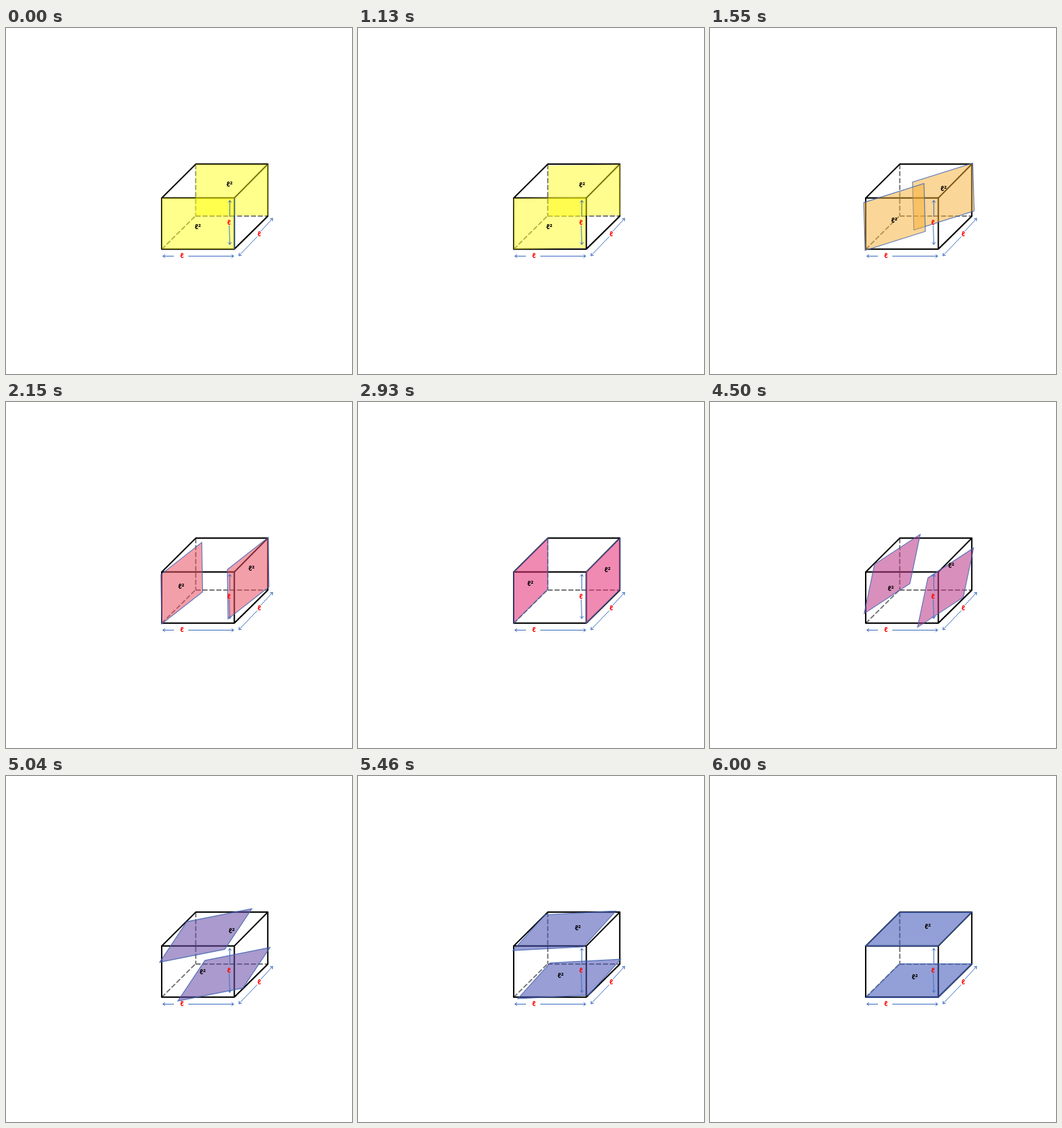
Recreate the animation shown at these times as an HTML page. Size 480x480 px, loop 7.2 s.

```html
<!DOCTYPE html>
<html lang="en">
<head>
<meta charset="utf-8">
<title>Box faces</title>
<style>
html, body { margin: 0; width: 100%; height: 100%; overflow: hidden; background: #fff; }
svg { display: block; width: 480px; height: 480px; }
.edge { fill: none; stroke: #000; stroke-width: 1.9; stroke-linejoin: round; }
.hidden { fill: none; stroke: #6b6b6b; stroke-width: 1.7; stroke-dasharray: 7 2.6; }
.arrow { fill: none; stroke: #4472c4; stroke-width: 1; }
text { font: bold 9.5px "Open Sans", "DejaVu Sans", sans-serif; text-anchor: middle; }
.size { fill: #f00; }
</style>
</head>
<body>
<svg viewBox="0 0 480 480">
  <path class="hidden" d="M263.3 189V260.5M216 307L263 260.5M263 260.8H363"/>
  <path class="edge" d="M216 235.8H316.7V306.8H216ZM216 235.8L263.3 188.8H363.2V261L316.7 306.8M316.7 235.8L363.2 188.8"/>
  <g id="faces"></g>
  <path id="side" d="M317 236V307" stroke="#3f62a8" stroke-width="1.2"/>
  <g id="arrows"></g>
  <text class="size" x="244" y="318.5">ℓ</text>
  <text class="size" x="309.3" y="272.5">ℓ</text>
  <text class="size" x="351.3" y="288.5">ℓ</text>
  <g id="labels"></g>
</svg>
<script>
const LOOP = 7200, STEP = 60, STEPS = 31;
const STARTS = [1130, 4200];

// Three poses: length and angle of the two sides, fill colour and opacity.
const POSES = [
  { w: 100.8, wa: 0, h: 71, ha: 90, rgb: [255, 255, 0], a: 0.45 },
  { w: 67, wa: -45, h: 71, ha: 90, rgb: [228, 42, 115], a: 0.55 },
  { w: 100.4, wa: 0, h: 66.5, ha: 135, rgb: [59, 82, 182], a: 0.55 }
];
// Centre of each face and of its label in every pose.
const FACES = [
  { mid: [[313.3, 224.8], [340, 248], [289.8, 284]], label: [[310, 217], [346, 233], [302, 209]] },
  { mid: [[266.4, 271.3], [239.7, 247.8], [289.6, 212.4]], label: [[266, 276], [239, 252], [284, 279]] }
];

const $ = id => document.getElementById(id);
const mix = (a, b, k) => a + (b - a) * k;
const mixAll = (a, b, k) => a.map((v, i) => mix(v, b[i], k));
const polar = (len, deg) => [len * Math.cos(deg * Math.PI / 180), len * Math.sin(deg * Math.PI / 180)];

function add(parent, tag, attrs) {
  const el = document.createElementNS("http://www.w3.org/2000/svg", tag);
  for (const k in attrs) el.setAttribute(k, attrs[k]);
  return parent.appendChild(el);
}

function bezier(x1, y1, x2, y2) {
  const at = (a, b, t) => 3 * a * t * (1 - t) ** 2 + 3 * b * t * t * (1 - t) + t ** 3;
  return x => {
    if (x <= 0 || x >= 1) return x <= 0 ? 0 : 1;
    let lo = 0, hi = 1;
    for (let i = 0; i < 24; i++) {
      const m = (lo + hi) / 2;
      if (at(x1, x2, m) < x) lo = m; else hi = m;
    }
    return at(y1, y2, lo);
  };
}
const ease = bezier(0.25, 0.14, 0.34, 1);

// A line from a tail to an open arrow head.
function arrow(x1, y1, x2, y2) {
  const dir = Math.atan2(y2 - y1, x2 - x1) * 180 / Math.PI;
  const [p, q] = [145, -145].map(d => polar(4, dir + d));
  add($("arrows"), "path", {
    class: "arrow",
    d: `M${x1} ${y1}L${x2} ${y2}M${x2 + p[0]} ${y2 + p[1]}L${x2} ${y2}L${x2 + q[0]} ${y2 + q[1]}`
  });
}
arrow(233, 316.5, 217.5, 316.5);
arrow(253, 316.5, 316, 316.5);
arrow(310.5, 262, 310.5, 239);
arrow(309.7, 274, 310.5, 300.5);
arrow(348.5, 289.5, 323, 316);
arrow(353.5, 282, 370, 264);

for (const f of FACES) {
  f.shape = add($("faces"), "polygon", { stroke: "#4266b2", "stroke-width": 1.1 });
  f.text = add($("labels"), "text", {});
  f.text.textContent = "ℓ²";
}

function progress(t, start) {
  const n = Math.floor((t - start) / STEP) + 1;
  return ease(n / STEPS);
}

function draw(t) {
  const from = t < STARTS[1] ? 0 : 1;
  const e = progress(t, STARTS[from]);
  const [p, q] = [POSES[from], POSES[from + 1]];
  const u = polar(mix(p.w, q.w, e), mix(p.wa, q.wa, e));
  const v = polar(mix(p.h, q.h, e), mix(p.ha, q.ha, e));
  if (from === 0) {
    const bow = 4 * e * (1 - e);
    v[0] += 2 * bow;
    v[1] -= 4.8 * bow;
  }
  const fill = `rgb(${mixAll(p.rgb, q.rgb, e).map(Math.round)})`;
  const corners = [[-1, -1], [1, -1], [1, 1], [-1, 1]];
  for (const f of FACES) {
    const c = mixAll(f.mid[from], f.mid[from + 1], e);
    const pts = corners.map(([a, b]) =>
      [0, 1].map(i => (c[i] + (a * u[i] + b * v[i]) / 2).toFixed(2)).join());
    f.shape.setAttribute("points", pts.join(" "));
    f.shape.setAttribute("fill", fill);
    f.shape.setAttribute("fill-opacity", mix(p.a, q.a, e));
    f.shape.setAttribute("stroke-opacity", from ? 0.85 : Math.min(0.85, e * 4));
    const [x, y] = mixAll(f.label[from], f.label[from + 1], e);
    f.text.setAttribute("x", x);
    f.text.setAttribute("y", y + 3.2);
  }
  $("side").style.display = t < STARTS[0] ? "" : "none";
}

const begin = performance.now();
function tick() {
  draw((performance.now() - begin) % LOOP);
  requestAnimationFrame(tick);
}
tick();
</script>
</body>
</html>
```
